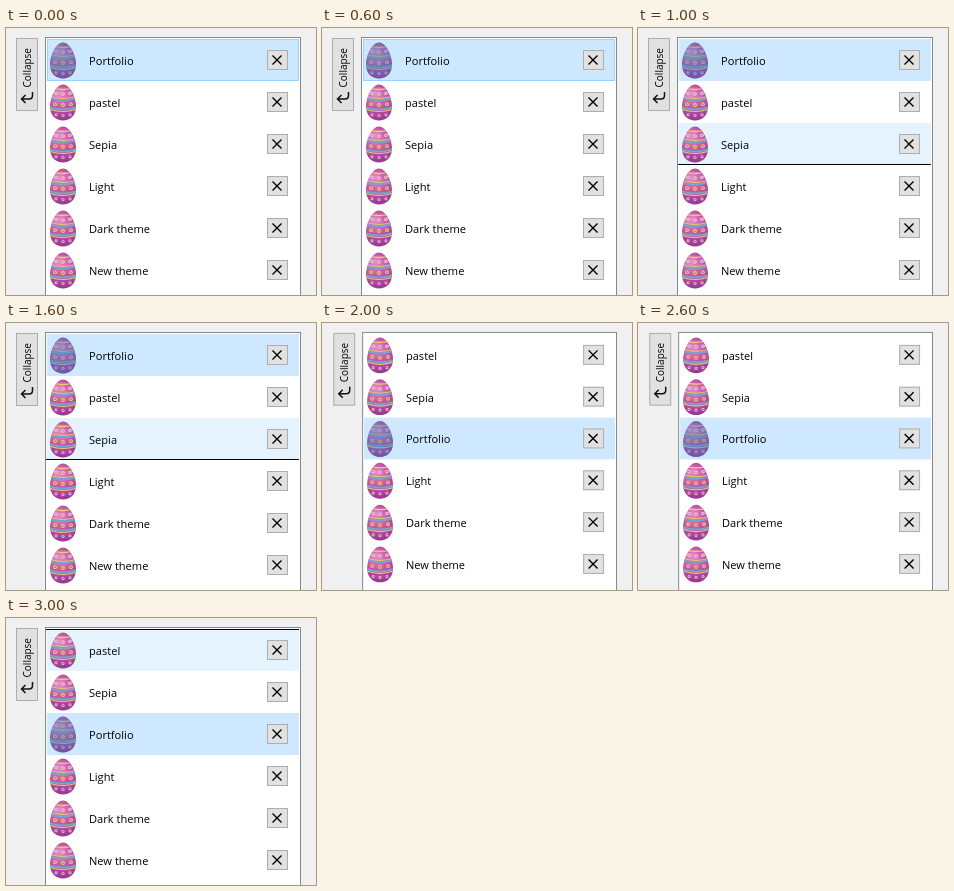
Write an HTML page with a canvas that moves like this. It is 310 px wide and 267 px high and loops after 4000 ms.

```html
<!DOCTYPE html>
<html lang="en">
<head>
<meta charset="utf-8">
<title>Reordering a theme list</title>
<style>
html, body { margin: 0; width: 100%; height: 100%; overflow: hidden; background: #f0f0f0; }
canvas { display: block; }
</style>
</head>
<body>
<canvas id="stage" width="310" height="267"></canvas>
<script>
const ctx = document.getElementById('stage').getContext('2d');
const before = ['Portfolio', 'pastel', 'Sepia', 'Light', 'Dark theme', 'New theme'];
const after = ['pastel', 'Sepia', 'Portfolio', 'Light', 'Dark theme', 'New theme'];

// Each state lasts one second; scale shrinks the view toward the list's right edge.
const states = [
  { names: before, selected: 0, outline: true },
  { names: before, selected: 0, hover: 2, drop: 136 },
  { names: after, selected: 2, scale: .9955 },
  { names: after, selected: 2, hover: 0, drop: 11 }
];

function box(x, y, w, h, fill, line) {
  ctx.fillStyle = fill;
  ctx.fillRect(x, y, w, h);
  if (!line) return;
  ctx.strokeStyle = line;
  ctx.lineWidth = 1;
  ctx.strokeRect(x + .5, y + .5, w - 1, h - 1);
}

function stroke(path, color, width) {
  ctx.strokeStyle = color;
  ctx.lineWidth = width;
  ctx.stroke(new Path2D(path));
}

function label(text, x, y, size) {
  ctx.font = '500 ' + size + 'px "Open Sans", "Noto Sans", sans-serif';
  ctx.fillStyle = '#000';
  ctx.fillText(text, x, y);
}

function dot(x, y, r, color) {
  ctx.fillStyle = color;
  ctx.beginPath();
  ctx.arc(x, y, r, 0, 7);
  ctx.fill();
}

// Row of flowers bending with the egg's surface
function flowers(y, step, r, petal, heart) {
  for (let x = -step; x <= step; x += step) {
    dot(x, y - x * x / 75, r, petal);
    dot(x, y - x * x / 75, r * .45, heart);
  }
}

function band(y, color, width) {
  stroke(`M-14 ${y - 2.5}Q0 ${y + 2.5} 14 ${y - 2.5}`, color, width);
}

function egg(x, y, selected) {
  ctx.save();
  ctx.translate(x, y);
  ctx.clip(new Path2D('M0-18C7-18 13-5 13 4C13 13 7 18 0 18S-13 13-13 4C-13-5-7-18 0-18Z'));
  const shade = ctx.createRadialGradient(-4, -9, 1, -1, -2, 20);
  shade.addColorStop(0, '#e58cc0');
  shade.addColorStop(.55, '#c353a8');
  shade.addColorStop(1, '#94388f');
  box(-14, -19, 28, 38, shade);
  band(-13, '#ecd26e', 1.3);
  flowers(-8.5, 7, 1.8, '#efcfe4', '#c560ad');
  band(-4, '#e8c86a', 1);
  band(-2.2, '#72a5d2', 2);
  flowers(2.5, 8, 1.9, '#f0cf52', '#c9589c');
  band(7, '#72a5d2', 2);
  band(9, '#e8c86a', 1.2);
  flowers(13, 7, 1.6, '#e7b7d9', '#b34a9f');
  if (selected) box(-14, -19, 28, 38, 'rgba(55,125,190,.4)');
  ctx.restore();
}

function collapseButton() {
  box(10, 10, 22, 73, '#e1e1e1', '#adadad');
  ctx.save();
  ctx.translate(25, 59.5);
  ctx.rotate(-Math.PI / 2);
  label('Collapse', 0, 0, 10);
  ctx.restore();
  stroke('M19.5 67L15.5 71L19.5 75M15.5 71H23Q26.5 71 26.5 67.5V64', '#111', 1.5);
}

function closeButton(y) {
  box(261, y + 11, 21, 20, '#e1e1e1', '#adadad');
  ctx.save();
  ctx.translate(271, y + 21);
  stroke('M-4.5-4.5L4.5 4.5M4.5-4.5L-4.5 4.5', '#000', 1.4);
  ctx.restore();
}

function draw({ names, selected, hover, drop, outline, scale = 1 }) {
  ctx.resetTransform();
  box(0, 0, 310, 267, '#f0f0f0');
  ctx.setTransform(scale, 0, 0, scale, 294.5 * (1 - scale), 0);
  collapseButton();
  box(39, 9, 256, 270, '#fff', '#828790');
  names.forEach((name, i) => {
    const y = 11 + i * 42;
    if (i === selected)
      box(41, y, 252, 42, outline ? '#cce8ff' : '#cde8ff', outline && '#99d1ff');
    else if (i === hover)
      box(41, y, 252, 42, '#e5f3ff');
    egg(57, y + 21.5, i === selected);
    label(name, 83, y + 26, 11.1);
    closeButton(y);
  });
  if (drop) box(40, drop, 253, 1, '#000');
}

function tick(now) {
  draw(states[Math.floor(now / 1000) % states.length]);
  requestAnimationFrame(tick);
}
tick(performance.now());
</script>
</body>
</html>
```
